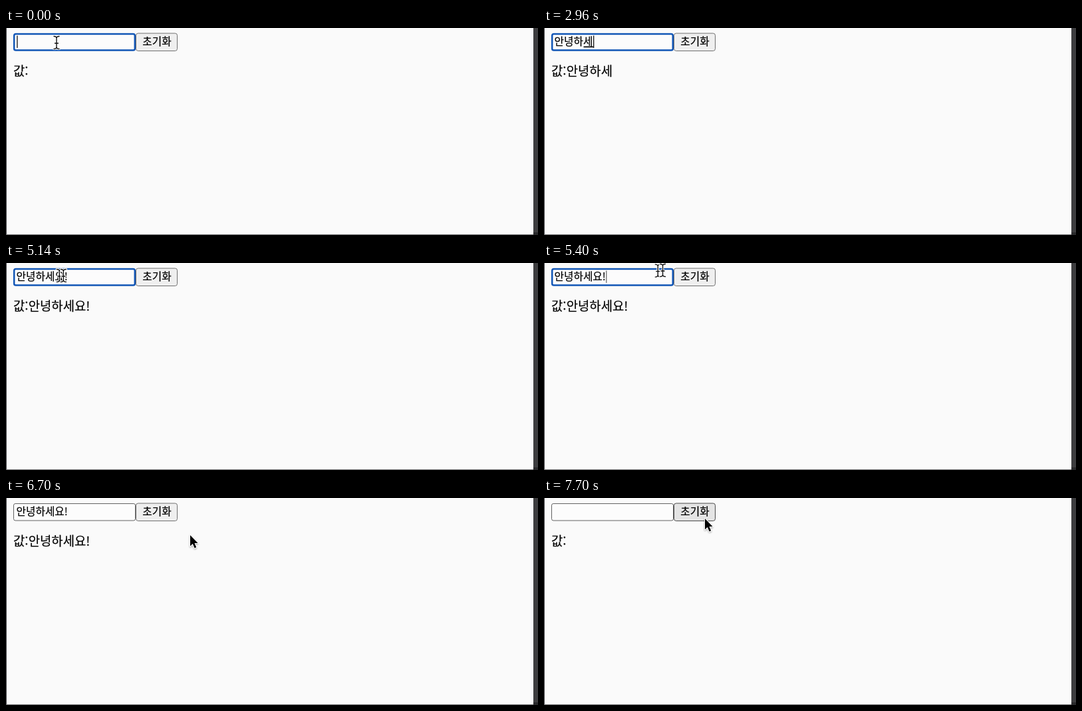
An HTML page for the animation above (8.8 s loop, 800x312 px).

```html
<!DOCTYPE html>
<html lang="ko">
<head>
<meta charset="utf-8">
<style>
html, body { margin: 0; width: 100%; height: 100%; overflow: hidden; background: #fafafa; }
svg { display: block; width: 800px; height: 312px; }
text { font-family: "Noto Sans CJK KR", "Noto Sans CJK", "Noto Sans KR", sans-serif; fill: #000; stroke: #000; stroke-width: .2; white-space: pre; }
.small { font-size: 15.7px; }
.large { font-size: 18.8px; }
</style>
</head>
<body>
<svg viewBox="0 0 800 312">
  <defs>
    <g id="beam" fill="none" stroke-linecap="round">
      <path id="beamLine" d="M-4-9.5Q0-9.5 0-6.5V6.5Q0 9.5-4 9.5M4-9.5Q0-9.5 0-6.5M0 6.5Q0 9.5 4 9.5M-2.5 1H2.5" stroke="#fff" stroke-width="3.2"/>
      <use href="#beamLine"/>
      <path d="M-4-9.5Q0-9.5 0-6.5V6.5Q0 9.5-4 9.5M4-9.5Q0-9.5 0-6.5M0 6.5Q0 9.5 4 9.5M-2.5 1H2.5" stroke="#111" stroke-width="1.4"/>
    </g>
    <filter id="soft" x="-50%" y="-50%" width="200%" height="200%">
      <feDropShadow dx="0" dy="1.2" stdDeviation="1.1" flood-opacity=".35"/>
    </filter>
  </defs>
  <rect width="800" height="312" fill="#fafafa"/>
  <rect width="1" height="312" fill="#47474a"/>
  <rect y="311" width="793" height="1" fill="#68686a"/>
  <rect x="793" width="7" height="312" fill="#3d3d3f"/>
  <rect x="793" y="308" width="7" height="4" fill="#29292b"/>

  <rect id="field" fill="#fcfcfc"/>
  <rect id="button" x="195.5" y="8" width="62" height="26.5" rx="3.2"/>
  <text class="small" x="227" y="25.7" text-anchor="middle">초기화</text>

  <text id="typed" class="small" x="15.6" y="25.9"></text>
  <rect id="mark" y="27.6" width="14.4" height="1.7"/>
  <rect id="caret" y="11.5" width="1.2" height="18.5"/>

  <text class="large" x="11" y="72.2">값:</text>
  <text id="value" class="large" x="33.8" y="72.2"></text>

  <use id="ghost" href="#beam"/>
  <use id="ibeam" href="#beam"/>
  <path id="arrow" d="M0 0V16.6L3.8 13.1L6.6 19.4L9.2 18.3L6.5 12.1H11.6Z" fill="#000" stroke="#fff" stroke-width="2" stroke-linejoin="round" paint-order="stroke" filter="url(#soft)"/>
</svg>
<script>
const LOOP = 8800, STEP = 14.45, BLUR = 6040, CLEAR = 7700;
const $ = id => document.getElementById(id);

// [time, finished text, syllable being composed]
const typing = [
  [0, '', ''], [820, '', 'ㅇ'], [1220, '', '아'], [1460, '', '안'],
  [1740, '안', 'ㄴ'], [1900, '안', '녀'], [2000, '안', '녕'],
  [2260, '안녕', 'ㅎ'], [2480, '안녕', '하'], [2720, '안녕', '핫'],
  [2960, '안녕하', '세'], [3560, '안녕하', '셍'], [3640, '안녕하세', '요'],
  [4220, '안녕하세요!', ''], [CLEAR, '', '']
];

// [time, x, y] of the pointer hot spot
const route = [
  [4800, 76, 22], [5040, 77, 21], [5120, 80, 19], [5140, 86, 19],
  [5400, 178, 11], [5500, 234, 13], [5580, 280, 21], [5640, 278, 31],
  [5680, 278, 37], [5860, 279, 53], [5980, 277, 56],
  [6700, 277, 56], [6860, 273, 53], [7060, 250, 37], [7220, 242, 31]
];

function pointer(t) {
  if (t <= route[0][0]) return route[0].slice(1);
  const i = route.findIndex(p => p[0] > t);
  if (i < 0) return route[route.length - 1].slice(1);
  const [t0, x0, y0] = route[i - 1], [t1, x1, y1] = route[i];
  const k = (t - t0) / (t1 - t0);
  return [x0 + (x1 - x0) * k, y0 + (y1 - y0) * k];
}

const ramp = (t, a, b) => Math.min(1, Math.max(0, (t - a) / (b - a)));

function caretAlpha(t) {
  if (t >= BLUR) return 0;
  if (t < 820) return 1 - ramp(t, 720, 800);
  return 1 - ramp(t, 4800, 4900) + ramp(t, 5340, 5440) - ramp(t, 5840, 5940);
}

function set(el, attrs) {
  for (const k in attrs) el.setAttribute(k, attrs[k]);
}

function place(el, [x, y], shown) {
  set(el, { transform: `translate(${x} ${y})`, visibility: shown ? 'visible' : 'hidden' });
}

function draw(t) {
  const [, done, composing] = typing.filter(s => s[0] <= t).pop();
  const text = done + composing;
  $('typed').textContent = text;
  $('value').textContent = text;

  const start = 16 + done.length * STEP;
  set($('mark'), { x: start + .2, visibility: composing ? 'visible' : 'hidden' });
  const end = done.endsWith('!') ? 93.2 : 16.3 + text.length * STEP;
  set($('caret'), { x: end, opacity: caretAlpha(t) });

  set($('field'), t < BLUR
    ? { x: 12.2, y: 9, width: 181.6, height: 24.6, rx: 2.6, stroke: '#1156b6', 'stroke-width': 2.5 }
    : { x: 11.5, y: 8.5, width: 183, height: 25.5, rx: 2.6, stroke: '#626262', 'stroke-width': 1 });

  const pos = pointer(t), [x, y] = pos;
  const over = x >= 195 && x < 258 && y >= 7 && y < 35;
  const pressed = t >= 7560 && t < CLEAR;
  set($('button'), {
    fill: pressed ? '#f5f5f5' : over ? '#e4e4e4' : '#efefef',
    stroke: pressed ? '#8d8d8d' : over ? '#4a4a4a' : '#707070'
  });

  const beam = (t < 820 || t >= 4800) && x < 195;
  place($('ibeam'), pos, beam);
  place($('ghost'), pointer(t - 20), beam && t > 5100);
  place($('arrow'), pos, x >= 195);
}

function tick() {
  draw(performance.now() % LOOP);
  requestAnimationFrame(tick);
}
tick();
</script>
</body>
</html>
```
